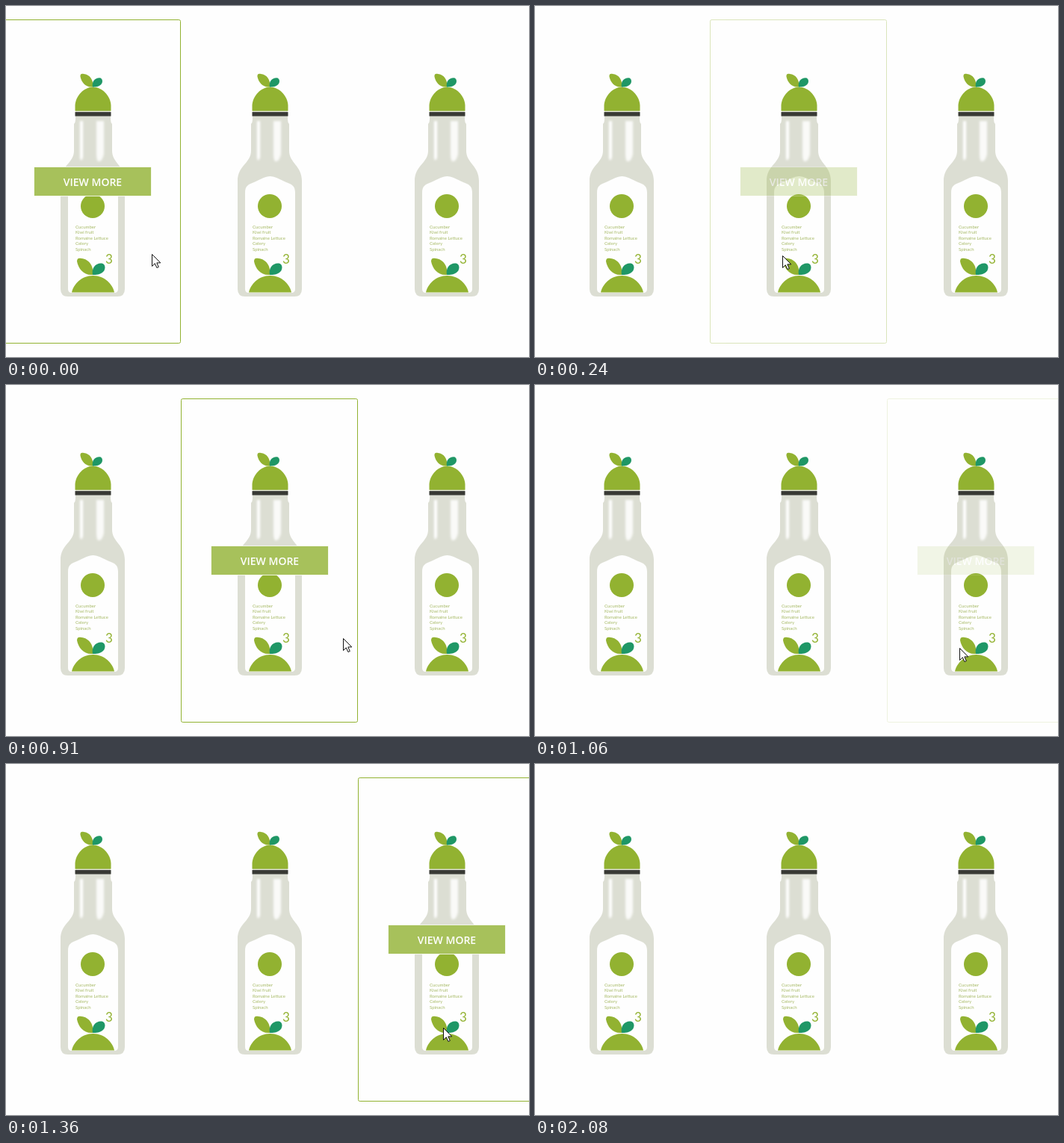
An HTML page that plays this animation: 700 by 470 pixels, repeating every 2.51 s.

```html
<!DOCTYPE html>
<html lang="en">
<head>
<meta charset="utf-8">
<title>Bottle cards</title>
<style>
  html, body { margin: 0; width: 100%; height: 100%; overflow: hidden; background: #fefefe; }
  svg { display: block; }
  .green { fill: #92b231; }
  .teal { fill: #1f9766; }
  .list { font: 6px Lato, sans-serif; fill: #a6b964; }
  .count { font: 17px Lato, sans-serif; fill: #92b231; }
  .button { font: 600 14px "Open Sans", sans-serif; fill: #fff; text-anchor: middle; }
</style>
</head>
<body>
<svg width="700" height="470" viewBox="0 0 700 470">
  <defs>
    <filter id="soft" x="-60%" y="-20%" width="220%" height="140%">
      <feGaussianBlur stdDeviation="1.5"/>
    </filter>
    <g id="leaves">
      <path class="green" d="M0 0C-12 1-19-8-21-18C-21-22-19-23-15-22C-5-21 2-12 0 0Z"/>
      <path class="teal" d="M0 0C-2-9 4-16 12-15.5C17-15 18-8 14-4C10 0 4 0 0 0Z"/>
    </g>
    <g id="bottle">
      <path fill="#dcded3" d="M93 140H140V152Q140 156 142 158V194C142 210 159 214 159 234V379Q159 389 149 389H83Q73 389 73 379V234C73 214 91 210 91 194V158Q93 156 93 152Z"/>
      <g fill="#fff" filter="url(#soft)">
        <path d="M99 154H103V203Q100 210 99 203Z"/>
        <path d="M121 154H131V198Q129 209 123 208Q121 205 121 198Z" opacity=".85"/>
      </g>
      <path fill="#fefefe" d="M83 250C83 240 88 239 95 236C104 232 110 228 116.5 228S129 232 138 236C145 239 150 240 150 250V379Q150 384 145 384H88Q83 384 83 379Z"/>
      <path class="green" d="M92.5 140.5V133C93 121 104 108.500 116.500 108.500S140 121 140.500 133V140.500Z"/>
      <rect x="92.5" y="142" width="48" height="5.5" fill="#393a35"/>
      <use href="#leaves" transform="translate(116 108.5) scale(.79)"/>
      <circle class="green" cx="116" cy="268" r="16"/>
      <g class="list" id="list"></g>
      <text class="count" x="133" y="344.5">3</text>
      <path class="green" d="M88 383.5C90 373 101 361 116.5 361S143 373 145 383.5Z"/>
      <use href="#leaves" x="116" y="360"/>
    </g>
  </defs>

  <g id="shelf"></g>
  <g id="hover">
    <rect x="-2.5" y="18.5" width="236" height="433" rx="2" fill="none" stroke="#92b231"/>
    <rect x="37.5" y="215.5" width="157" height="39" fill="#a7c15b" stroke="#fff" stroke-opacity=".8"/>
    <text class="button" x="116" y="241">VIEW MORE</text>
  </g>
  <path id="cursor" fill="#fff" stroke="#111" d="M.5.5V16.5L4.3 12.8L6.9 18.5L9.3 17.5L6.8 11.9H11.8Z"/>
</svg>
<script>
  const LOOP = 2510, LEAVE = 2080, FADE = 200, CARD = 237;
  const $ = id => document.getElementById(id);

  function add(parent, tag, attrs, text = '') {
    const el = document.createElementNS('http://www.w3.org/2000/svg', tag);
    for (const name in attrs) el.setAttribute(name, attrs[name]);
    el.textContent = text;
    parent.append(el);
  }

  ['Cucumber', 'Kiwi fruit', 'Romaine Lettuce', 'Celery', 'Spinach'].forEach((word, i) =>
    add($('list'), 'text', { x: 93, y: 297.5 + i * 7.5 }, word));
  for (let i = 0; i < 3; i++) add($('shelf'), 'use', { href: '#bottle', x: i * CARD });

  // the picture holds still between these moments
  const ticks = [0, 120, 240, 390, 780, 910, 1060, 1210, 1360, 1640, 1770, 1920, LEAVE];
  // when the pointer enters each card
  const enters = [-FADE, 176, 1032];
  const stops = [
    { at: 0, x: 195, y: 332 },
    { at: 240, x: 331, y: 334 },
    { at: 390, x: 345, y: 334 },
    { at: 910, x: 451, y: 339 },
    { at: 1060, x: 568, y: 352 },
    { at: 1360, x: 585, y: 353 },
    { at: 1920, x: 614, y: 453 }
  ];

  // each move starts slowly and speeds up
  function pointer(t) {
    const i = stops.findLastIndex(stop => stop.at <= t);
    const a = stops[i], b = stops[i + 1] || a;
    const k = a === b ? 0 : ((t - a.at) / (b.at - a.at)) ** 2.5;
    return [a.x + (b.x - a.x) * k, a.y + (b.y - a.y) * k].map(Math.round);
  }

  function draw(time) {
    const t = ticks.findLast(tick => tick <= time % LOOP);
    const card = enters.findLastIndex(enter => enter <= t);
    const shown = t < LEAVE ? 'visible' : 'hidden';
    $('hover').setAttribute('transform', `translate(${card * CARD} 0)`);
    $('hover').setAttribute('opacity', Math.min(1, (t - enters[card]) / FADE));
    $('cursor').setAttribute('transform', `translate(${pointer(t)})`);
    for (const id of ['hover', 'cursor']) $(id).setAttribute('visibility', shown);
  }

  const start = performance.now();
  function tick() {
    draw(performance.now() - start);
    requestAnimationFrame(tick);
  }
  tick();
</script>
</body>
</html>
```
